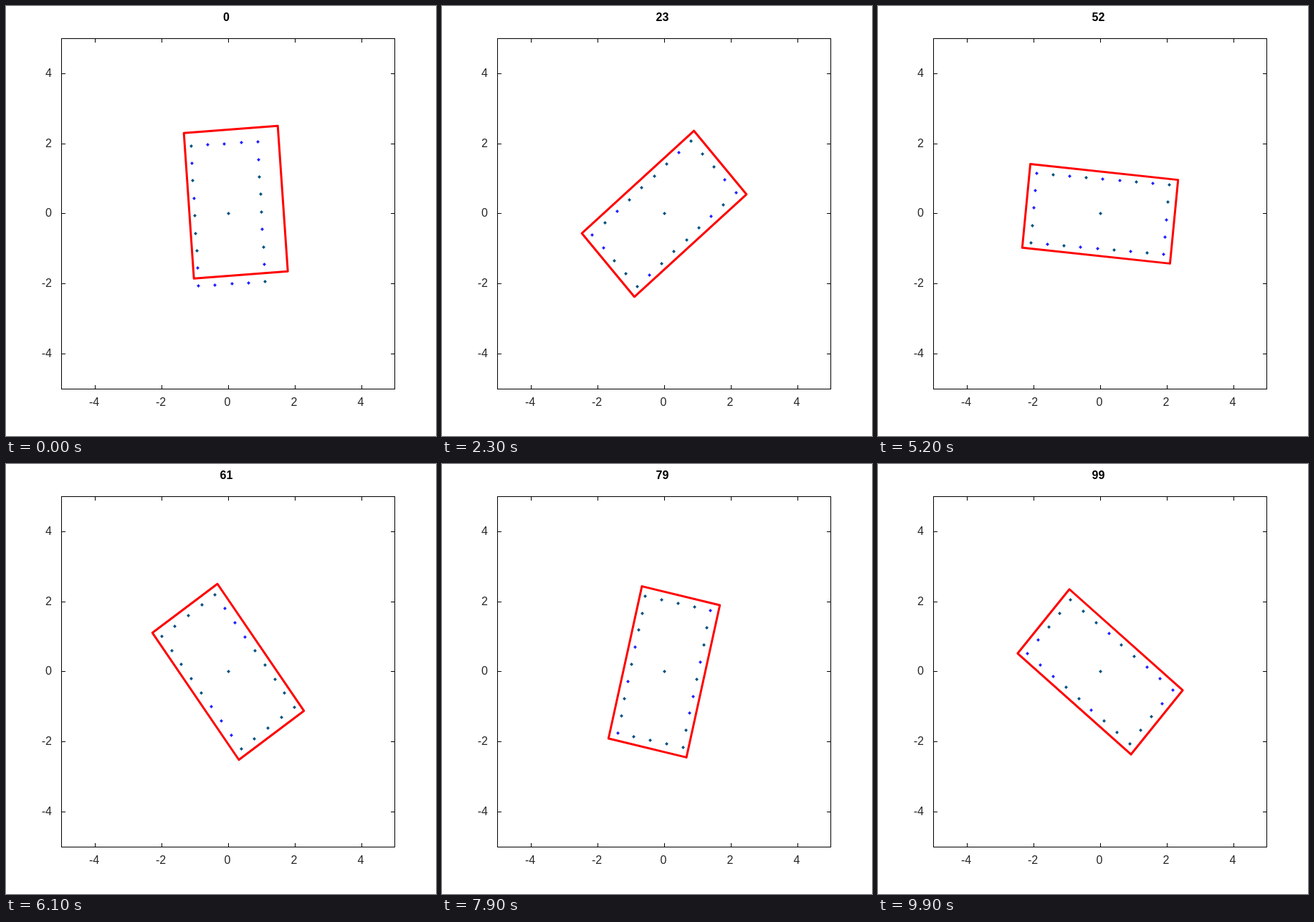
Animation, 600 px wide and 600 px high, one loop 10 s. Source, as an HTML page with a canvas:

```html
<!DOCTYPE html>
<html lang="en">
<head>
<meta charset="utf-8">
<title>Rotating rectangle tracker</title>
<style>
html, body { margin: 0; width: 100%; height: 100%; overflow: hidden; background: #fff; }
canvas { display: block; }
</style>
</head>
<body>
<canvas id="stage" width="600" height="600"></canvas>
<script>
const ctx = document.getElementById('stage').getContext('2d');
const CX = 310, CY = 289.99, SX = 46.5, SY = 48.9;
const RAD = Math.PI / 180;

// Outline points of a 4 x 2 rectangle, plus its centre
const dots = [[0, 0]];
for (let u = -2; u <= 2; u += 0.5)
  for (let v = -1; v <= 1; v += 0.5)
    if (Math.abs(u) === 2 || Math.abs(v) === 1) dots.push([u, v]);

function project([u, v], deg) {
  const c = Math.cos(deg * RAD), s = Math.sin(deg * RAD);
  return [CX + SX * (u * c - v * s), CY - SY * (u * s + v * c)];
}

function label(text, x, y, align) {
  ctx.textAlign = align;
  ctx.fillText(text, x, y);
}

function drawAxes() {
  ctx.fillStyle = '#000';
  ctx.fillRect(77, 45, 466, 1);
  ctx.fillRect(77, 534, 466, 1);
  ctx.fillRect(77, 45, 1, 490);
  ctx.fillRect(542, 45, 1, 490);
  ctx.font = '16px "Liberation Sans", Arial, sans-serif';
  for (let n = -4; n <= 4; n += 2) {
    const x = Math.floor(CX + n * SX), y = Math.floor(CY - n * SY);
    ctx.fillStyle = '#000';
    ctx.fillRect(x, 46, 1, 5);
    ctx.fillRect(x, 529, 1, 5);
    ctx.fillRect(78, y, 5, 1);
    ctx.fillRect(537, y, 5, 1);
    ctx.fillStyle = '#262626';
    label(n, x - 1, 558, 'center');
    label(n, 64, y + 5, 'right');
  }
}

function drawDot(point, deg) {
  const [x, y] = project(point, deg).map(Math.floor);
  const px = x + 0.5, py = y + 0.5, r = 2.4;
  ctx.fillStyle = (x + y) % 2 ? '#005080' : '#2020ff';
  ctx.beginPath();
  ctx.moveTo(px - r, py);
  ctx.lineTo(px, py - r);
  ctx.lineTo(px + r, py);
  ctx.lineTo(px, py + r);
  ctx.fill();
}

// The estimate settles quickly, then trails the true angle
function drawEstimate(step, deg) {
  const err = Math.exp(-step / 2);
  const lag = 1 - 1.95 * err - 0.7 * Math.max(0, (step - 90) / 9);
  const u = (4.457 - 0.295 * err) / 2, v = (2.4 + 0.425 * err) / 2;
  ctx.strokeStyle = '#f00';
  ctx.lineWidth = 3;
  ctx.lineJoin = 'round';
  ctx.beginPath();
  for (const corner of [[u, v], [u, -v], [-u, -v], [-u, v]]) {
    const [x, y] = project(corner, deg - lag);
    ctx.lineTo(x + 10.7 * err, y - 16.3 * err);
  }
  ctx.closePath();
  ctx.stroke();
}

function draw(now) {
  const step = Math.floor(now / 100) % 100, n = step + 1;
  const deg = 90 + 3.1 * n + 0.1 * n * n;  // constant angular acceleration
  ctx.fillStyle = '#fff';
  ctx.fillRect(0, 0, 600, 600);
  drawAxes();
  ctx.fillStyle = '#000';
  ctx.font = 'bold 16px "Liberation Sans", Arial, sans-serif';
  label(step, 307.5, 21, 'center');
  for (const dot of dots) drawDot(dot, deg);
  drawEstimate(step, deg);
}

const start = performance.now();
function tick() {
  draw(performance.now() - start);
  requestAnimationFrame(tick);
}
tick();
</script>
</body>
</html>
```
